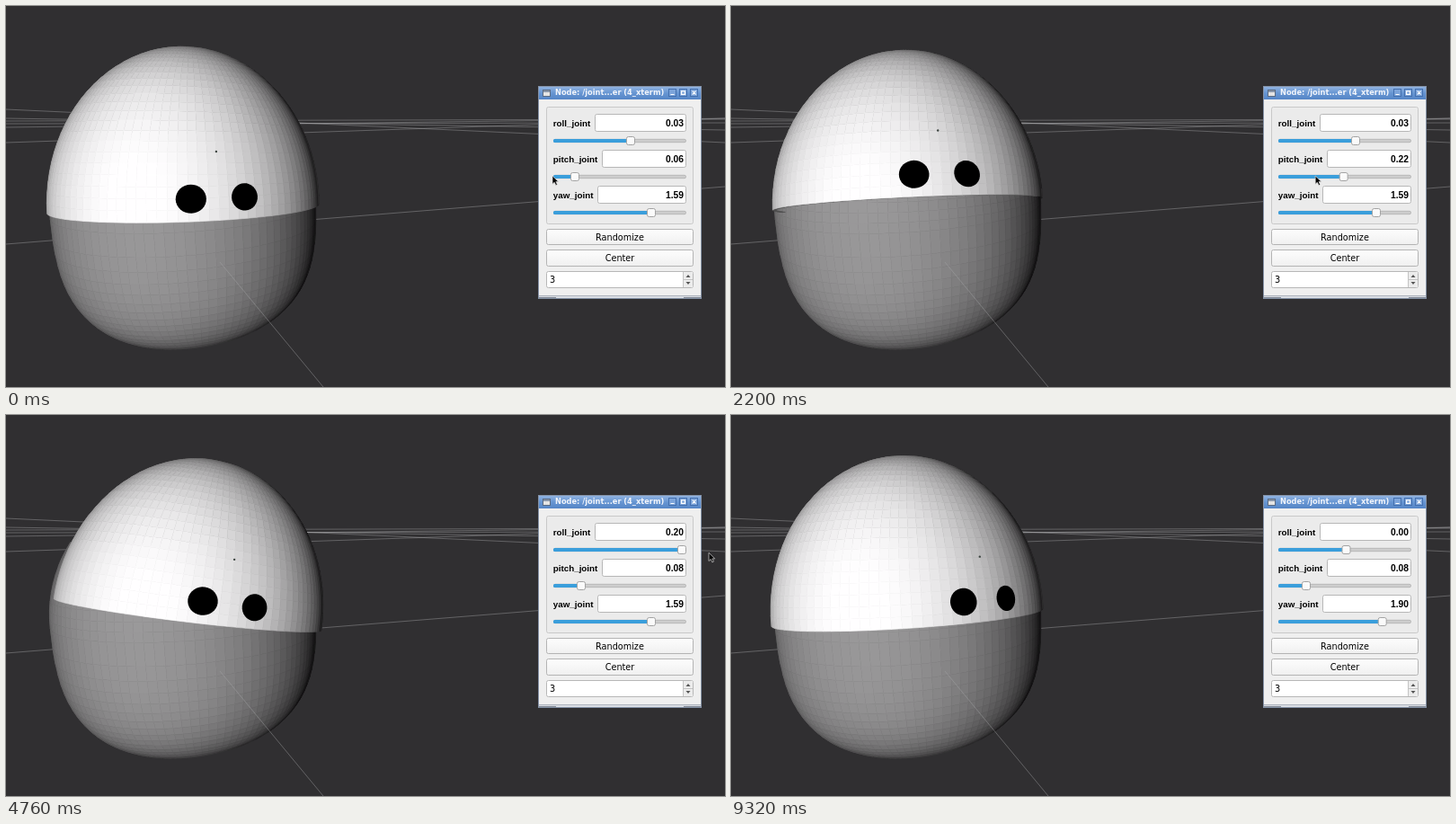
Recreate the animation shown at these times as an HTML page with a canvas. Size 800 px wide and 424 px high, loop 9.48 s.

```html
<!DOCTYPE html>
<html lang="en">
<head>
<meta charset="utf-8">
<title>Joint sliders</title>
<style>
  html, body { margin: 0; width: 100%; height: 100%; overflow: hidden; background: #302f31; }
  canvas, svg { position: absolute; left: 0; top: 0; width: 800px; height: 424px; display: block; }
  .label { font: bold 9.8px "Liberation Sans", Arial, sans-serif; }
  .value { font: bold 10.3px "Liberation Sans", Arial, sans-serif; text-anchor: end; }
  .ui { font: 9.7px "DejaVu Sans", sans-serif; }
  .title { font: bold 8.25px "DejaVu Sans", sans-serif; fill: #f2f5fb; }
  .mid { text-anchor: middle; }
  .field { fill: #fff; stroke: #b7b7b7; }
  .button { fill: url(#face); stroke: #b4b4b4; }
</style>
</head>
<body>
<canvas id="scene" width="800" height="424"></canvas>
<svg id="panel" viewBox="0 0 800 424">
  <defs>
    <linearGradient id="bar" x2="0" y2="1">
      <stop offset="0" stop-color="#8fb2e0"/><stop offset=".5" stop-color="#6695d2"/><stop offset="1" stop-color="#5585c6"/>
    </linearGradient>
    <linearGradient id="face" x2="0" y2="1">
      <stop offset="0" stop-color="#fdfdfd"/><stop offset="1" stop-color="#f0f0f0"/>
    </linearGradient>
  </defs>
  <rect x="592" y="89" width="182" height="237" fill="#d9dde3"/>
  <rect x="593" y="90" width="180" height="14" fill="url(#bar)"/>
  <rect x="593" y="104" width="180" height="218" fill="#efefef"/>
  <rect x="592.5" y="89.5" width="181" height="236" fill="none" stroke="#8592a6"/>
  <path d="M593 322.5H773" stroke="#aeb4bd"/>
  <path d="M593 324.5H612M754 324.5H773" stroke="#7f8793"/>
  <rect x="597.5" y="93.5" width="8" height="7" fill="#e4e4e4" stroke="#5b6b82"/>
  <path d="M598 95H605" stroke="#8a97aa" stroke-width="2"/>
  <text class="title" x="611" y="99.4">Node: /joint...er (4_xterm)</text>
  <g fill="#7ca4da" stroke="#436fae">
    <rect x="737.5" y="92.5" width="8" height="8"/>
    <rect x="749.5" y="92.5" width="8" height="8"/>
    <rect x="761.5" y="92.5" width="8" height="8"/>
  </g>
  <path d="M739.5 98.5h4M751.5 94.8h4v3.6h-4zM763.7 94.7l3.8 3.8m0-3.8l-3.8 3.8" fill="none" stroke="#fff" stroke-width="1.2"/>
  <rect x="601.5" y="112.5" width="163" height="130" rx="2" fill="#ebebeb" stroke="#c9c9c9"/>
  <g id="rows"></g>
  <rect class="button" x="601.5" y="248.5" width="163" height="17" rx="2"/>
  <text class="ui mid" x="683" y="260.7">Randomize</text>
  <rect class="button" x="601.5" y="271.5" width="163" height="18" rx="2"/>
  <text class="ui mid" x="683" y="284.2">Center</text>
  <rect class="field" x="601.5" y="295.5" width="163" height="18" rx="2"/>
  <path d="M754 296h10v17h-10z" fill="#ececec"/>
  <path d="M753.5 296v17M754 304.5h10" stroke="#c4c4c4"/>
  <path d="M756.5 302l2.5-3 2.5 3zM756.5 307l2.5 3 2.5-3z" fill="#555"/>
  <text class="ui" x="605" y="308.2">3</text>
  <path id="cursor" d="M0 0V9.2L2.2 7.2 3.8 10.6 5.4 9.8 3.9 6.6H6.7Z" fill="#000" stroke="#ddd" stroke-width=".7"/>
</svg>
<script>
const LOOP = 9480, STEP = 40;
const { sin, cos, sqrt, abs, PI, min, max, floor, round } = Math;
const range = (n, f) => Array.from({ length: n }, (_, i) => f(i));
const clamp = (v, lo, hi) => max(lo, min(hi, v));

// ---- Pointer path: [time, position]; the sliders follow it ----
const pointerX = [[-160, 634], [0, 608], [600, 608], [1440, 789], [1560, 788], [1600, 765],
  [2320, 641], [2600, 641], [3280, 696], [3560, 696], [4000, 612], [4480, 745], [4640, 783],
  [4760, 782], [5440, 665], [5800, 665], [5960, 682], [6080, 684], [6400, 719], [6440, 719],
  [6720, 767], [7320, 666], [7760, 664], [8080, 612], [8480, 725.7], [8720, 725.7], [9120, 753]];
const pointerY = [[0, 189], [2600, 189], [2960, 99], [3280, 149], [4480, 153], [5960, 156],
  [6080, 157], [6400, 230], [8720, 231], [9120, -14]];

function sample(keys, t) {
  const n = keys.findIndex(k => k[0] > t);
  if (n < 0) return keys[keys.length - 1][1];
  const [t0, v0] = keys[n - 1], [t1, v1] = keys[n];
  const s = (t - t0) / (t1 - t0);
  return v0 + (v1 - v0) * s * s * (3 - 2 * s);
}

// ---- Panel rows; each joint is dragged between grab and drop ----
const LAG = 160, TRACK = 614, SPAN = 138;
const joints = [
  { name: "roll", y: 130, left: 655, lo: -.2, hi: .2, grab: 3560, drop: 6120 },
  { name: "pitch", y: 170, left: 663, lo: 0, hi: .44, grab: -LAG, drop: 2480 },
  { name: "yaw", y: 210, left: 658, lo: -PI, hi: PI, grab: 6440, drop: 8640 }
];
const knobX = (j, t) => clamp(sample(pointerX, clamp(t - LAG, j.grab, j.drop)) - 1, TRACK, TRACK + SPAN);
const angle = (j, t) => j.lo + (j.hi - j.lo) * (knobX(j, t) - TRACK) / SPAN;

const rows = document.getElementById("rows");
rows.innerHTML = joints.map(j => `
  <text class="label" x="608.8" y="${j.y + 3.6}">${j.name}_joint</text>
  <rect class="field" x="${j.left + .5}" y="${j.y - 9.5}" width="${756 - j.left}" height="19" rx="2"/>
  <text class="value" x="754" y="${j.y + 3.6}"></text>
  <rect x="609.5" y="${j.y + 18.3}" width="147" height="3.4" rx="1.5" fill="#cdcdcd" stroke="#b0b0b0" stroke-width=".8"/>
  <rect class="fill" x="609" y="${j.y + 18}" width="0" height="4" rx="1.5" fill="#3a9edb"/>
  <rect class="knob" y="${j.y + 15.5}" width="9" height="9" rx="2" fill="#fafafa" stroke="#a3a3a3"/>`).join("");
const pick = c => [...rows.querySelectorAll(c)];
const values = pick(".value"), fills = pick(".fill"), knobs = pick(".knob");
const cursor = document.getElementById("cursor");

function drawPanel(t) {
  joints.forEach((j, i) => {
    const x = knobX(j, t);
    values[i].textContent = angle(j, t).toFixed(2).replace("-0.00", "0.00");
    fills[i].setAttribute("width", x - 609);
    knobs[i].setAttribute("x", x - 4.5);
  });
  cursor.setAttribute("transform", `translate(${sample(pointerX, t)} ${sample(pointerY, t)})`);
}

// ---- 3D scene, in units of the cap radius ----
const FOCAL = 512, TILT = .159, FACING = .47;
const CENTER = { x: -1.392, y: .665, z: 3.7 };
const CAP = 1.245, PIVOT = .2, SEGMENTS = 104;

function toCamera(u, v, w) {
  const x = CENTER.x + u * cos(FACING) + w * sin(FACING);
  const y = CENTER.y - v;
  const z = CENTER.z + u * sin(FACING) - w * cos(FACING);
  return [x, y * cos(TILT) - z * sin(TILT), z * cos(TILT) + y * sin(TILT)];
}
const project = ([x, y, z]) => [400 + FOCAL * x / z, 212 + FOCAL * y / z];

// The cap turns about a point slightly below its rim
function placer({ roll, pitch, yaw }) {
  return (r, v, a) => {
    a += yaw - PI / 2;
    v += PIVOT;
    const u = r * sin(a), w = r * cos(a);
    const v1 = v * cos(pitch) + w * sin(pitch), w1 = w * cos(pitch) - v * sin(pitch);
    return toCamera(u * cos(roll) + v1 * sin(roll), v1 * cos(roll) - u * sin(roll) - PIVOT, w1);
  };
}

const capProfile = range(28, i => {
  const t = PI / 2 * (1 - i / 27);
  return [1.004 * cos(t), CAP * sin(t)];
});
const lip = [[1.004, 0], [.985, 0]];
const bodyProfile = range(10, i => .6 - i * .06).map(t => [.98 * cos(t), 1.05 * sin(t)])
  .concat(range(25, i => {
    const t = PI / 2 * i / 24, e = 2 / 2.8;
    return [.98 * max(0, cos(t)) ** e, -1.052 * sin(t) ** e];
  }));

function polygon(g, pts, color, edge = .6) {
  g.beginPath();
  pts.forEach(p => g.lineTo(p[0], p[1]));
  g.closePath();
  g.fillStyle = g.strokeStyle = color;
  g.fill();
  if (edge) {
    g.lineWidth = edge;
    g.stroke();
  }
}

function area(p) {
  return p.reduce((s, a, i) => {
    const b = p[(i + 1) % p.length];
    return s + a[0] * b[1] - b[0] * a[1];
  }, 0);
}

// Flat shading with a light that shines along the viewing axis
function facing([a, b, c, d]) {
  const p = c.map((v, i) => v - a[i]), q = d.map((v, i) => v - b[i]);
  const nx = p[1] * q[2] - p[2] * q[1], ny = p[2] * q[0] - p[0] * q[2], nz = p[0] * q[1] - p[1] * q[0];
  return abs(nz) / (Math.hypot(nx, ny, nz) || 1);
}

function revolve(profile, place) {
  const rings = profile.map(([r, v]) => range(SEGMENTS + 1, j => place(r, v, 2 * PI * j / SEGMENTS)));
  const faces = [];
  for (let i = 0; i + 1 < rings.length; i++)
    for (let j = 0; j < SEGMENTS; j++) {
      const solid = [rings[i][j], rings[i][j + 1], rings[i + 1][j + 1], rings[i + 1][j]];
      const flat = solid.map(project);
      faces.push({ solid, flat, front: area(flat) > 0 });
    }
  return faces;
}

function shade(g, faces, ambient, diffuse) {
  for (const f of faces) {
    if (!f.front) continue;
    const k = min(255, round(ambient + diffuse * facing(f.solid)));
    polygon(g, f.flat, `rgb(${k},${k - 1},${k})`);
  }
}

function line(g, x1, y1, x2, y2) {
  g.beginPath();
  g.moveTo(x1, y1);
  g.lineTo(x2, y2);
  g.strokeStyle = "rgba(165,165,168,.55)";
  g.lineWidth = .8;
  g.stroke();
}

function layer(draw) {
  const c = document.createElement("canvas");
  c.width = 800;
  c.height = 424;
  draw(c.getContext("2d"));
  return c;
}

const backdrop = layer(g => {
  g.fillStyle = "#302f31";
  g.fillRect(0, 0, 800, 424);
  for (const [left, right] of [[128, 126], [131, 130], [135, 125], [152, 125], [115, 152], [125, 138]])
    line(g, 0, left, 800, right);
  line(g, 0, 265, 800, 201);
});
const body = layer(g => {
  shade(g, revolve(bodyProfile, (r, v, a) => toCamera(r * sin(a), v, r * cos(a))), 16, 138);
  line(g, 238, 285, 353, 424);
});

function drawEye(g, place, az) {
  const rim = range(32, i => {
    const t = 2 * PI * i / 32, v = .14 + .088 * sin(t);
    return place(sqrt(1 - (v / CAP) ** 2) * 1.008, v, az + .088 * cos(t));
  }).map(project);
  if (area(rim) < 0) polygon(g, rim, "#000", 0);
}

function drawDot(g, place) {
  const at = place(.94, .43, 0), above = place(.94, .45, 0), side = place(.94, .43, .02);
  if (area([at, above, side].map(project)) < 0) return;
  const [x, y] = project(at);
  g.fillStyle = "#3c4440";
  g.beginPath();
  g.arc(x, y, 1.2, 0, 2 * PI);
  g.fill();
}

const g = document.getElementById("scene").getContext("2d");

function drawScene(pose) {
  const place = placer(pose);
  const cap = revolve(capProfile, place);
  g.drawImage(backdrop, 0, 0);
  cap.forEach(f => f.front || polygon(g, f.flat, "#1d1d1e"));
  g.drawImage(body, 0, 0);
  const middle = place(0, 0, 0)[2] - .2;
  shade(g, revolve(lip, place).filter(f => f.solid[0][2] < middle), 70, 160);
  shade(g, cap, 26, 232);
  drawEye(g, place, -.165);
  drawEye(g, place, .165);
  drawDot(g, place);
}

const start = performance.now();
let last = -1;
function tick() {
  const t = floor((max(0, performance.now() - start) % LOOP) / STEP) * STEP;
  if (t !== last) {
    last = t;
    drawScene(Object.fromEntries(joints.map(j => [j.name, angle(j, t)])));
    drawPanel(t);
  }
  requestAnimationFrame(tick);
}
tick();
</script>
</body>
</html>
```
